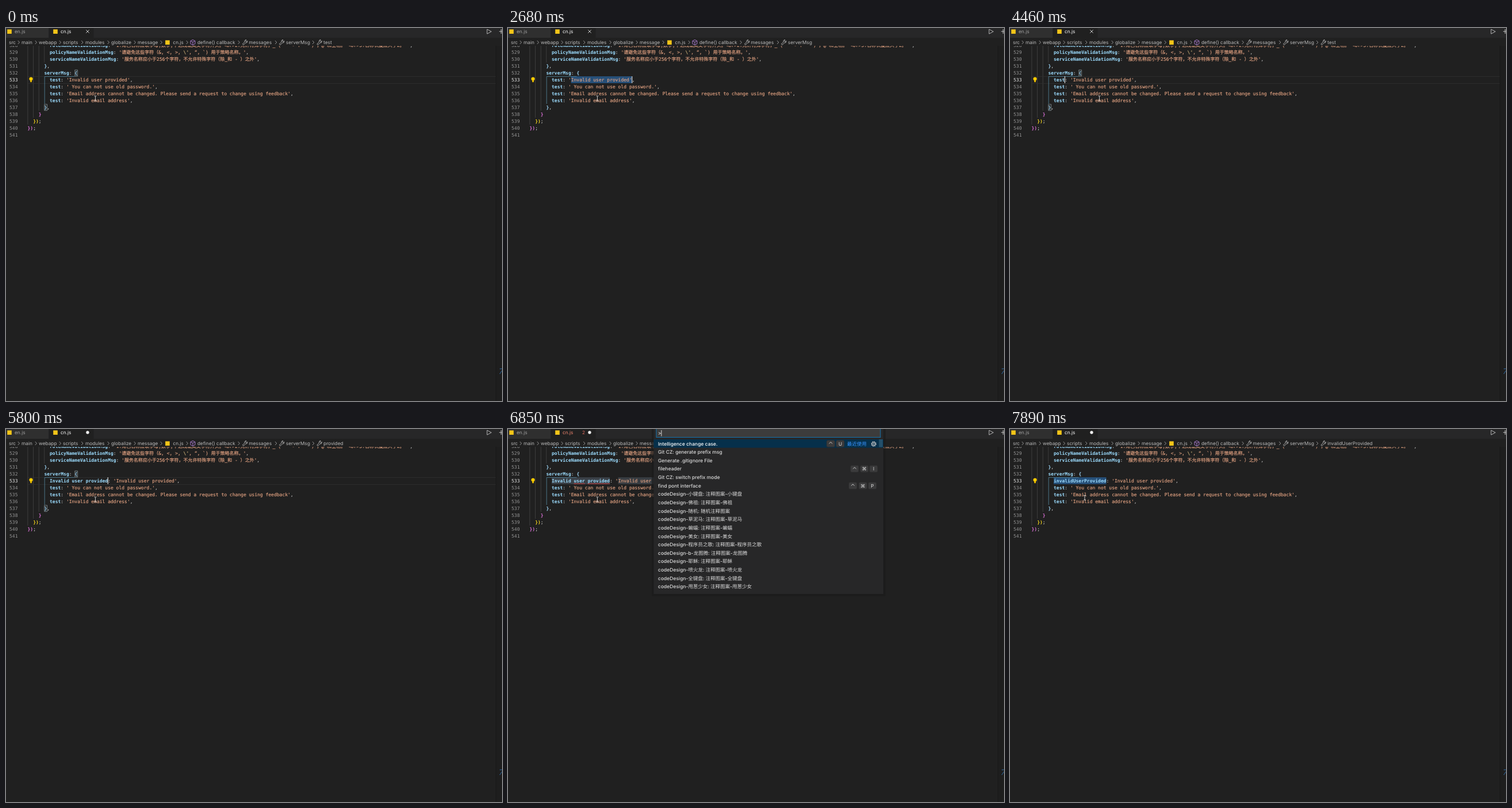
Write an HTML page that moves like this. It is 863 px wide and 649 px high and loops after 8000 ms.

```html
<!DOCTYPE html>
<html lang="en">
<head>
<meta charset="utf-8">
<title>Editor</title>
<style>
html, body { margin: 0; width: 100%; height: 100%; overflow: hidden; background: #202020; }
svg { display: block; width: 863px; height: 649px; }
text { white-space: pre; text-rendering: geometricPrecision; }
.code { font: 8px "DejaVu Sans Mono", "Noto Sans CJK SC", "Noto Sans CJK", monospace; }
.ui { font: 8.3px Inter, "Noto Sans CJK SC", "Noto Sans CJK", "DejaVu Sans", sans-serif; }
.list { font-size: 8.5px; font-weight: 500; }
.k { fill: #9cdcfe; font-weight: bold; }
.w { fill: #dedede; }
.s { fill: #e5a483; stroke: #e5a483; stroke-width: .15px; }
.e { fill: #d7ba7d; font-weight: bold; }
.b { fill: #9fd8fa; font-weight: bold; }
.p { fill: #da70d6; font-weight: bold; }
.y { fill: #f2d21c; font-weight: bold; }
</style>
</head>
<body>
<svg id="stage" viewBox="0 0 863 649"></svg>
<script>
const LOOP = 8000, CH = 4.816, LEFT = 37.5, ROW = 12, KEY = 76;
const stage = document.getElementById('stage');

const first = {
  key: 'test', caret: null, sel: null, marks: [], crumb: 'test',
  box: true, line: true, dirty: false, err: false, palette: false, mouse: [155.5, 122.5]
};
const tests = [533, 534, 535, 536].map(r => [r, 0, 4]);

// Each step changes part of the editor state at a time in ms.
const steps = [
  [0, {}],
  [150, { caret: 5 }],
  [600, { caret: null }],
  [1200, { caret: 6 }],
  [1650, { caret: 7 }],
  [1800, { caret: 28, sel: [7, 28] }],
  [2100, { line: false, box: false, crumb: '' }],
  [2240, { caret: 29, sel: [7, 29] }],
  [2830, { caret: 28, sel: [7, 28] }],
  [2980, { crumb: 'test' }],
  [3420, { caret: null }],
  [3870, { caret: 28, sel: null, line: true }],
  [4020, { caret: 6, box: true }],
  [4170, { caret: 5 }],
  [4460, { caret: 4 }],
  [4610, { marks: tests }],
  [4910, { caret: 0, sel: [0, 4], line: false }],
  [5050, { box: false }],
  [5350, { key: 'Invalid user provided', caret: 21, sel: null, marks: [], dirty: true, line: true }],
  [5500, { box: true }],
  [5800, { crumb: 'provided' }],
  [5950, { caret: 0, sel: [0, 21], marks: [[533, 24, 45]], line: false }],
  [6100, { err: true, box: false, crumb: '' }],
  [6400, { caret: null }],
  [6850, { palette: true }],
  [7300, { palette: false, key: 'invalidUserProvided', sel: [0, 19], marks: [] }],
  [7750, { err: false, crumb: 'invalidUserProvided' }],
  [7890, { mouse: [130, 119.5] }]
];
let last = first;
const states = steps.map(([, change]) => last = { ...last, ...change });

const esc = s => s.replace(/&/g, '&amp;').replace(/</g, '&lt;');
const mid = row => 90 + (row - 533) * ROW;
const rect = (x, y, w, h, fill, more = '') =>
  `<rect x="${x}" y="${y}" width="${w}" height="${h}" fill="${fill}" ${more}/>`;
const path = (d, color, width = 1, more = 'fill="none"') =>
  `<path d="${d}" stroke="${color}" stroke-width="${width}" ${more}/>`;
const ui = (x, y, s, fill = '#a9a9a9', cls = '') =>
  `<text class="ui ${cls}" x="${x}" y="${y + 3}" fill="${fill}">${esc(s)}</text>`;
const span = (row, a, b, fill) =>
  rect(KEY + a * CH, mid(row) - 6, (b - a) * CH, ROW, fill);
const fileIcon = (x, y) => rect(x - 3.8, y - 3.6, 7.6, 7.6, '#f5c518');

// Parts are strings whose first letter picks the colour class.
const code = (row, col, ...parts) =>
  `<text class="code" x="${LEFT + col * CH}" y="${mid(row) + 3}">` +
  parts.map(p => `<tspan class="${p[0]}">${esc(p.slice(1))}</tspan>`).join('') + '</text>';
const entry = (row, key, ...value) => code(row, 8, 'k' + key, 'w: ', ...value, 'w,');

const listing = key => [
  entry(528, 'roleNameValidationMsg',
    "s'1.角色名称应以字母,数字,下划线或英文字符开头。<br>2.允许特殊字符，_ (  ' - . '  ) ，@ 和空格。 <br>3.名称长度应大于2。 '"),
  entry(529, 'policyNameValidationMsg', "s'请避免这些字符（&, <, >, ", "e\\'", "s, “, `) 用于策略名称。'"),
  entry(530, 'serviceNameValidationMsg', "s'服务名称应小于256个字符，不允许特殊字符（除_和 - ）之外'"),
  code(531, 6, 'b}', 'w,'),
  code(532, 6, 'kserverMsg', 'w: ', 'b{'),
  entry(533, key, "s'Invalid user provided'"),
  entry(534, 'test', "s' You can not use old password.'"),
  entry(535, 'test', "s'Email address cannot be changed. Please send a request to change using feedback'"),
  entry(536, 'test', "s'Invalid email address'"),
  code(537, 6, 'b}', 'w,'),
  code(538, 4, 'p}'),
  code(539, 2, 'y})', 'w;'),
  code(540, 0, 'p})', 'w;')
].join('');

function gutter() {
  let out = '';
  for (let n = 528; n <= 541; n++)
    out += `<text class="code" x="6" y="${mid(n) + 3}" fill="${n === 533 ? '#e6e6e6' : '#949494'}">${n}</text>`;
  [540, 539, 538].forEach((end, i) => {
    out += rect(LEFT + i * 2 * CH, 30, 0.8, mid(end) - 36, '#444');
  });
  return out + rect(66.4, 30, 0.8, 30, '#444') +
    '<circle cx="43.5" cy="88.5" r="3.1" fill="#ffcc00"/>' + rect(42, 91, 3, 3.2, '#e0b400');
}

function editor(s) {
  let out = gutter();
  if (s.line) out += path('M38 84.5H852M38 96.5H852', '#2f2f2f', 0.9);
  s.marks.forEach(m => out += span(...m, m[0] === 533 && m[1] ? '#383d42' : '#414446'));
  if (s.sel) out += span(533, ...s.sel, s.palette ? '#3a4047' : '#264f78');
  out += path('M119.5 84.3H67.2V132', '#578ba1', 0.8);
  out += listing(s.key);
  if (s.box)
    out += path('M119.8 73h4.8v10.8h-4.8zM66.8 132.8h4.8v10.8h-4.8z', '#8c9a9c', 0.8);
  if (s.err) {
    const wave = (a, b) => path(`M${KEY + a * CH} 96` + 'l1.2 -1.4l1.2 1.4'.repeat((b - a) * 2), '#f14c4c', 0.8);
    out += wave(8, 12) + wave(13, 21);
  }
  if (s.caret !== null && !s.palette) out += rect(KEY + s.caret * CH - 0.4, 84, 1.1, ROW, '#e4e4e4');
  const [x, y] = s.mouse;
  return out + path(`M${x - 2} ${y - 4.5}q2 0 2 1.5v6q0 1.5 -2 1.5M${x + 2} ${y - 4.5}q-2 0 -2 1.5M${x + 2} ${y + 4.5}q-2 0 -2 -1.5`, '#ddd', 0.9);
}

const wrench = x => path(
  `M${x - 4} 28l3.8 -3.8q-.8 -3 2.5 -3.8l-1 2.4l1.3 1.1l2 -1.4q.3 3.7 -3.4 3.5l-3.6 3.5z`, '#bdbdbd', 0.9);

function breadcrumbs(s) {
  const items = [[5, 'src'], [27, 'main'], [57, 'webapp'], [99, 'scripts'], [138, 'modules'],
    [183, 'globalize'], [229, 'message'], [290.5, 'cn.js'], [333, 'define() callback'],
    [422.5, 'messages'], [487, 'serverMsg']];
  const arrows = [22, 52, 94, 132.5, 178, 224, 270, 315, 405, 469.5];
  let out = rect(0, 17, 852, 14, '#202020');
  if (s.crumb) {
    items.push([552.3, s.crumb]);
    arrows.push(534.5);
    out += wrench(545);
  }
  out += items.map(([x, name]) => ui(x, 25, name, '#bababa')).join('');
  out += arrows.map(x => path(`M${x - 1.3} 22l2.8 3l-2.8 3`, '#a0a0a0', 0.9)).join('');
  return out + fileIcon(281, 25) + wrench(415.5) + wrench(479.5) +
    path('M325 20.5l4 2v5l-4 2l-4 -2v-5zM321 22.5l4 2l4 -2M325 24.5v5', '#b180d7', 0.9);
}

function tabs(s) {
  const status = s.dirty
    ? '<circle cx="142" cy="6" r="2.7" fill="#eee"/>'
    : path('M139.3 3.3l5.4 5.4m0 -5.4l-5.4 5.4', '#ddd', 0.9);
  return rect(0, 0, 863, 17, '#272728') + rect(0, 0, 74, 17, '#2f2f2f') + rect(74.5, 0, 78, 17, '#202020') +
    fileIcon(6, 6) + fileIcon(86, 6) +
    ui(15, 6, 'en.js', '#a0a0a0') + ui(95, 6, 'cn.js', s.err ? '#f48771' : '#fff') +
    (s.err ? ui(129, 6, '2', '#d9695c') : '') + status +
    path('M837 2.2l7.5 4l-7.5 4z', '#c5c5c5', 0.9) + path('M858 6H863M861.5 2V10', '#c5c5c5', 1);
}

const edge = () => rect(852, 31, 11, 618, '#1e1e1e') + rect(852, 31, 1, 618, '#191919') +
  path('M859 593H863M863 596l-4 6', '#2f74b5', 0.9);

const designs = ['小键盘', '佛祖', '随机', '草泥马', '蝙蝠', '美女', '程序员之歌', 'b-龙图腾', '耶稣', '喷火龙', '全键盘', '甩葱少女'];
const commands = ['Intelligence change case.', 'Git CZ: generate prefix msg', 'Generate .gitignore File',
  'fileheader', 'Git CZ: switch prefix mode', 'find pont interface',
  ...designs.map(d => `codeDesign-${d}: ` + (d === '随机' ? '随机注释图案' : '注释图案-' + d.replace('b-', '')))];

function keycap(x, y, label) {
  const cap = rect(x - 7, y - 5.8, 14, 11.5, '#3b3b3c', 'rx="2" stroke="#303030" stroke-width=".7"');
  return cap + (label === '^'
    ? path(`M${x - 2.7} ${y}l2.7 -2.8l2.7 2.8`, '#ddd', 0.9)
    : `<g text-anchor="middle">${ui(x, y, label, '#ddd')}</g>`);
}

function palette() {
  const y = i => 25.5 + i * 14.64;
  const caps = (row, ...keys) => keys.map(([x, label]) => keycap(x, y(row), label)).join('');
  return rect(250, 0, 407, 291, '#191919', 'opacity=".6"') +
    rect(253.5, 0, 399.5, 287, '#272728') +
    rect(258, -3, 390, 17.5, '#3c3c3c', 'stroke="#1373ae" stroke-width="1"') +
    ui(261, 7, '>', '#ddd', 'list') + rect(266.5, 2, 0.9, 10.5, '#eee') +
    rect(253.5, 18, 399.5, 14.6, '#06304b') + rect(645.5, 18, 6.5, 13.5, '#24506b') +
    commands.map((c, i) => ui(261, y(i), c, i ? '#dcdcdc' : '#fff', 'list')).join('') +
    caps(0, [561.5, '^'], [578, 'U']) +
    caps(3, [603, '^'], [620, '⌘'], [636, 'I']) +
    caps(5, [600, '^'], [617.5, '⌘'], [634, 'P']) +
    ui(590, y(0), '最近使用', '#3794ff', 'list') +
    '<circle cx="636.3" cy="26" r="3.7" fill="none" stroke="#d0d0d0" stroke-width="1.7" stroke-dasharray="1.7 1.2"/>' +
    '<circle cx="636.3" cy="26" r="3" fill="none" stroke="#d0d0d0" stroke-width=".8"/>' +
    '<circle cx="636.3" cy="26" r="1.2" fill="none" stroke="#d0d0d0" stroke-width=".8"/>';
}

let shown = -1;
function draw(now) {
  const t = now % LOOP;
  const i = steps.filter(([start]) => start <= t).length - 1;
  if (i !== shown) {
    const s = states[shown = i];
    stage.innerHTML = rect(0, 0, 863, 649, '#202020') + editor(s) + breadcrumbs(s) +
      tabs(s) + edge() + (s.palette ? palette() : '');
  }
}

const origin = performance.now();
function tick() {
  draw(performance.now() - origin);
  requestAnimationFrame(tick);
}
tick();
</script>
</body>
</html>
```
